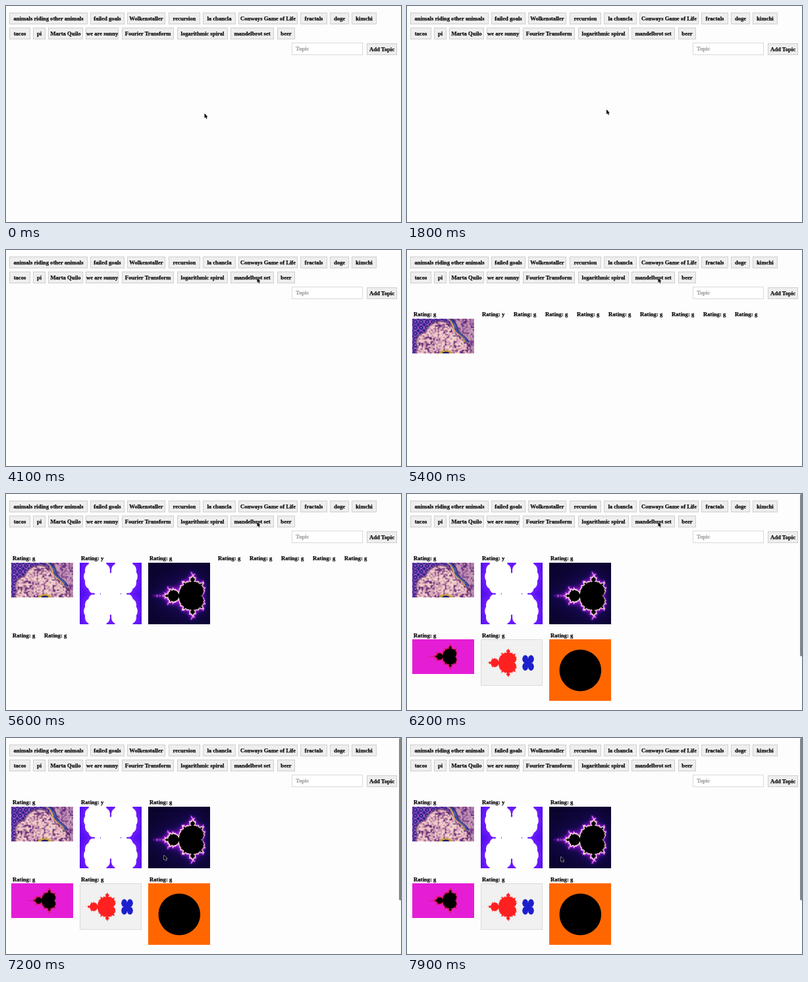
Recreate the animation shown at these times as an HTML page with a canvas. Size 600x330 px, loop 8000 ms.

```html
<!DOCTYPE html>
<html lang="en">
<head>
<meta charset="utf-8">
<title>Topics</title>
<style>
html, body { margin: 0; width: 100%; height: 100%; overflow: hidden; background: #fefdfe; }
#stage { position: relative; width: 600px; height: 330px; overflow: hidden; background: #fefdfe;
  font: bold 8.65px "Liberation Serif", "Times New Roman", serif; color: #0c0c0c;
  -webkit-text-stroke: .25px currentColor; white-space: nowrap; }
#stage > * { position: absolute; box-sizing: border-box; }
.button { height: 18px; line-height: 16px; text-align: center; border: 1px solid #cfcfcf;
  background: #eee; }
#field { left: 434px; top: 56px; width: 108px; height: 19px; line-height: 17px; padding-left: 5px;
  border: 1px solid #d9d9d9; background: #fff; color: #a3a3a3; }
.label { line-height: 12px; }
#bar { right: 0; top: 0; width: 3px; height: 248px; border-radius: 2px 0 0 2px; background: #858585; }
#cursor { left: 0; top: 0; width: 10px; height: 12px; overflow: visible; }
</style>
</head>
<body>
<div id="stage"></div>
<script>
const LOOP = 8000;
const stage = document.getElementById('stage');

function add(tag, props, style) {
  const el = Object.assign(document.createElement(tag), props);
  Object.assign(el.style, style);
  return stage.appendChild(el);
}

function button(text, left, right, top) {
  add('div', { className: 'button', textContent: text },
    { left: left + 'px', width: right - left + 'px', top: top + 'px' });
}

[['animals riding other animals', 5, 124], ['failed goals', 128, 180], ['Wolkenstaller', 184, 242],
 ['recursion', 247, 295], ['la chancla', 299, 349], ['Conways Game of Life', 353, 443],
 ['fractals', 447, 488], ['doge', 492, 521], ['kimchi', 525, 563]]
  .forEach(([text, a, b]) => button(text, a, b, 10));
[['tacos', 5, 37], ['pi', 41, 60], ['Marta Quilo', 64, 117], ['we are sunny', 121, 171],
 ['Fourier Transform', 176, 255], ['logarithmic spiral', 260, 337], ['mandelbrot set', 341, 407],
 ['beer', 412, 439]]
  .forEach(([text, a, b]) => button(text, a, b, 33));
add('div', { id: 'field', textContent: 'Topic' });
button('Add Topic', 548, 594, 57);

const clamp = v => Math.max(0, Math.min(1, v));
const mix = (a, b, k) => a.map((v, i) => v + (b[i] - v) * clamp(k));

// Smooth escape count of z^2 + c; Infinity inside the set.
function escape(cx, cy, limit = 120) {
  let x = 0, y = 0;
  for (let n = 0; n < limit; n++) {
    const xx = x * x, yy = y * y;
    if (xx + yy > 16) return n + 1 - Math.log2(Math.log(xx + yy) / Math.log(16));
    [x, y] = [xx - yy + cx, 2 * x * y + cy];
  }
  return Infinity;
}

// Smooth seeded noise, about one bump per unit.
function hash(x, y) {
  const v = Math.sin(x * 127.1 + y * 311.7) * 43758.5453;
  return v - Math.floor(v);
}
function noise(x, y) {
  const ix = Math.floor(x), iy = Math.floor(y);
  const ease = v => v * v * (3 - 2 * v);
  const u = ease(x - ix), v = ease(y - iy);
  const top = hash(ix, iy) * (1 - u) + hash(ix + 1, iy) * u;
  const low = hash(ix, iy + 1) * (1 - u) + hash(ix + 1, iy + 1) * u;
  return top * (1 - v) + low * v;
}

// Renders a colour function of pixel position, averaging 3 x 3 samples.
function picture(w, h, shade) {
  const el = add('canvas', { width: w, height: h });
  const ctx = el.getContext('2d');
  const img = ctx.createImageData(w, h);
  for (let y = 0; y < h; y++) for (let x = 0; x < w; x++) {
    const sum = [0, 0, 0];
    for (let s = 0; s < 9; s++) {
      const c = shade(x + (s % 3 + .5) / 3, y + (Math.floor(s / 3) + .5) / 3);
      for (let i = 0; i < 3; i++) sum[i] += c[i] / 9;
    }
    img.data.set([...sum, 255], (y * w + x) * 4);
  }
  ctx.putImageData(img, 0, 0);
  return el;
}

const WHITE = [255, 255, 255], BLACK = [0, 0, 0];

// Mottled pink lobes, ringed blue corner and a coloured diagonal seam.
function mosaic(x, y) {
  const tone = noise(x / 2.2, y / 2.2) * .65 + noise(x / 5 + 40, y / 5) * .35;
  const rings = Math.sin(Math.hypot(x % 9 - 4.5, y % 9 - 4.5) * 2);
  const lobes = Math.min(Math.hypot(x - 21, y - 36) - 15, Math.hypot(x - 43, y - 28) - 24,
    Math.hypot(x - 32, y - 56) - 27, Math.hypot(x - 65, y - 50) - 24) + tone * 3 - 1.5;
  const seam = x - 56 - y * .72 - 2 * Math.sin(y * .25);
  const spot = Math.hypot((x - 51) / 10, (y - 53) / 5);
  const pink = tone < .45 ? mix([205, 150, 178], [95, 45, 115], (.45 - tone) * 4.5)
    : mix([205, 150, 178], [242, 208, 200], (tone - .45) * 4);
  if (spot < 1) return spot < .55 ? [35, 35, 110] : [205, 160, 55];
  if (Math.abs(seam) < 4 && y < 36)
    return mix(pink, seam < -1.5 ? [215, 155, 70] : seam < 1.5 ? [30, 80, 175] : [45, 25, 110], .8);
  if (Math.abs(lobes) < 1) return mix(pink, [75, 35, 100], .6);
  if (lobes < 0) return pink;
  if (x > 58) return mix(pink, [115, 60, 150], .35);
  return mix([70, 40, 160], rings > 0 ? [175, 95, 185] : [25, 30, 125], Math.abs(rings) * tone * 1.6);
}

// Four scalloped lobes, 110 units tall; below 1 inside.
function lobed(x, y) {
  const u = (Math.abs(x) - 20) / 20, v = (Math.abs(y) - 26.5) / 27;
  const bumps = .07 * Math.abs(Math.cos(Math.atan2(v, u) * 6));
  return Math.abs(x) < 15 && Math.abs(y) < 27 ? 0 : Math.hypot(u, v) + .03 - bumps;
}

function fourLobes(x, y) {
  const d = lobed(x - 47, y - 47.5);
  return d < 1 ? WHITE : mix([112, 28, 255], [80, 14, 238], (d - 1) * 2);
}

function glow(x, y) {
  const n = escape((x - 71.5) / 33, (y - 50.5) / 33);
  if (n === Infinity || n < 2.7) return BLACK;
  if (n < 6) return mix([9, 3, 42], [22, 8, 78], (n - 2.7) / 3.3);
  if (n < 10) return mix([22, 8, 78], [120, 20, 190], (n - 6) / 4);
  if (n < 15) return mix([120, 20, 190], [250, 120, 235], (n - 10) / 5);
  return mix([250, 120, 235], [255, 250, 225], (n - 15) / 6);
}

function magenta(x, y) {
  const n = escape((x - 60) / 18.3, (y - 26.3) / 18.3);
  return n === Infinity ? BLACK : mix([229, 30, 214], [215, 20, 75], (n - 8) / 8);
}

function pair(x, y) {
  if (x < 1 || y < 1 || x > 93 || y > 70) return [218, 218, 218];
  if (escape((x - 44.7) / 23.4, (y - 35.8) / 23.4) > 32) return [255, 32, 32];
  if (lobed((x - 72) * 4.6, (y - 36) * 4.6) < 1) return [30, 30, 205];
  return [241, 241, 241];
}

const disc = (x, y) => Math.hypot(x - 47.3, y - 47.5) < 31.7 ? BLACK : [255, 102, 0];

const pictures = [[94, 53, mosaic], [94, 94, fourLobes], [94, 94, glow],
  [94, 53, magenta], [94, 71, pair], [94, 94, disc]].map((p, i) => {
  const el = picture(...p);
  el.style.left = 8 + i % 3 * 104 + 'px';
  el.style.top = (i < 3 ? 105 : 222) + 'px';
  return el;
});

const labels = Array.from({ length: 10 }, (_, i) =>
  add('div', { className: 'label', textContent: 'Rating: ' + (i === 1 ? 'y' : 'g') }));
const bar = add('div', { id: 'bar' });

stage.insertAdjacentHTML('beforeend', `<svg id="cursor" viewBox="0 0 10 12">
  <path d="M0 0V7.2L1.6 5.8 2.8 8.4 4 7.9 2.9 5.4H5Z" fill="#000" stroke="#fff" stroke-width=".9"
    paint-order="stroke"/></svg>`);
const cursor = document.getElementById('cursor');

const loads = [5400, 5500, 5600, 5700, 5900, 6100];

// Loaded items sit in a grid of three; waiting ones follow in a tight row.
function layout(t) {
  const count = loads.filter(at => t >= at).length;
  pictures.forEach((el, i) => el.style.visibility = i < count ? 'visible' : 'hidden');
  bar.style.visibility = count > 4 ? 'visible' : 'hidden';
  let x = 10, row = 0;
  labels.forEach((el, i) => {
    if (i < count ? i && i % 3 === 0 : x > 560 || (i === 6 && count === 6)) { x = 10; row++; }
    el.style.left = x + 'px';
    el.style.top = 91.5 + row * 118 + 'px';
    el.style.visibility = count ? 'visible' : 'hidden';
    x += i < count ? 104 : 48;
  });
}

// time, x, y of the pointer tip
const path = [[0, 301.5, 164], [1700, 301.5, 164], [1800, 303, 158], [2000, 314, 130], [2200, 334.5, 94],
  [2300, 334.5, 94], [2500, 360, 62], [2700, 388, 41], [2900, 388, 41], [3000, 381.5, 42.5],
  [6200, 381.5, 42.5], [6400, 366, 58], [6700, 307, 116], [7000, 249, 172], [7200, 240, 179],
  [7900, 234, 181.5], [LOOP, 234, 181.5]];

function point(t) {
  const i = path.findIndex(p => p[0] > t);
  const [a, b] = [path[i - 1], path[i]];
  return mix(a, b, (t - a[0]) / (b[0] - a[0]));
}

let last = -1;
function draw(now) {
  const t = Math.floor(now % LOOP / 100) * 100;
  if (t !== last) {
    last = t;
    layout(t);
    const [, x, y] = point(t);
    cursor.style.transform = `translate(${x}px, ${y}px)`;
  }
  requestAnimationFrame(() => draw(performance.now() - start));
}
const start = performance.now();
draw(0);
</script>
</body>
</html>
```
